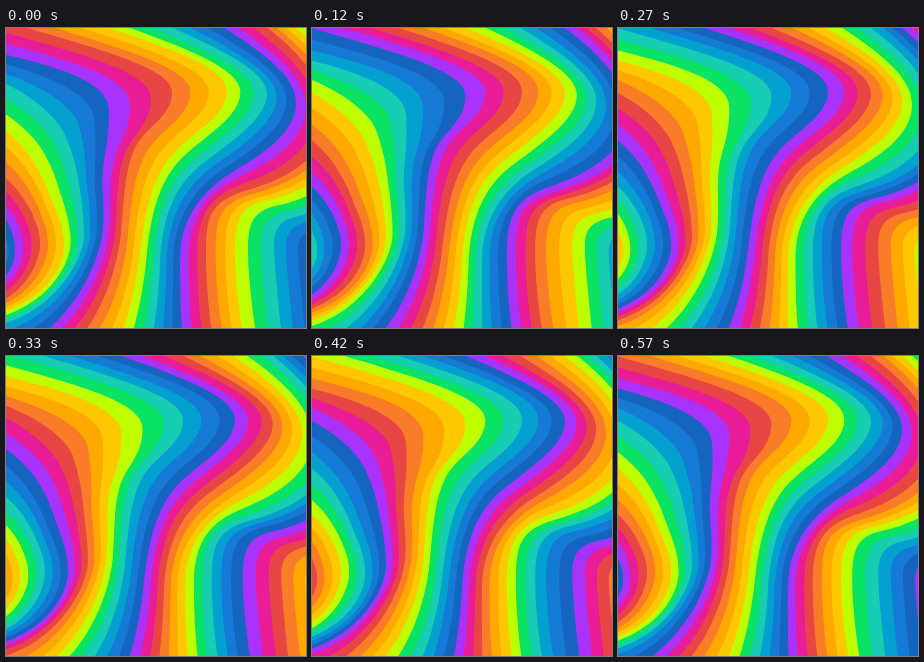
Animation, 300 px wide and 300 px high, one loop 600 ms. Source, as an HTML page without scripts:

```html
<!DOCTYPE html>
<html lang="en">
<head>
<meta charset="utf-8">
<title>Rainbow flow</title>
<style>
html, body { margin: 0; width: 100%; height: 100%; overflow: hidden; background: #1565c0; }
body { position: relative; }
div { display: contents; }

/* Each sheet covers all that lies left of its edge; the edge sweeps the stage in four loops. */
i {
  position: absolute;
  inset: 0;
  background: var(--c);
  animation: flow 2400ms infinite, rank 2400ms infinite;
  animation-timing-function: steps(5), linear;
  animation-delay: calc((var(--g) * 12 + var(--k)) * -50ms - 2ms);
}

/* 30 ms ticks, shifted so that all sheets move together */
i:nth-child(3n+2) {
  animation-timing-function: linear(-.0667 0% 13.33%, .1333 13.33% 33.33%, .3333 33.33% 53.33%,
    .5333 53.33% 73.33%, .7333 73.33% 93.33%, .9333 93.33% 100%), linear;
}
i:nth-child(3n) {
  animation-timing-function: linear(-.1333 0% 6.67%, .0667 6.67% 26.67%, .2667 26.67% 46.67%,
    .4667 46.67% 66.67%, .6667 66.67% 86.67%, .8667 86.67% 100%), linear;
}

i:nth-child(1)  { --k: 0;  --c: #ffc800; }
i:nth-child(2)  { --k: 1;  --c: #beff00; }
i:nth-child(3)  { --k: 2;  --c: #0ae364; }
i:nth-child(4)  { --k: 3;  --c: #16cdb2; }
i:nth-child(5)  { --k: 4;  --c: #03a0d0; }
i:nth-child(6)  { --k: 5;  --c: #147ad4; }
i:nth-child(7)  { --k: 6;  --c: #1565c0; }
i:nth-child(8)  { --k: 7;  --c: #a832fa; }
i:nth-child(9)  { --k: 8;  --c: #e81c96; }
i:nth-child(10) { --k: 9;  --c: #e84644; }
i:nth-child(11) { --k: 10; --c: #f97c28; }
i:nth-child(12) { --k: 11; --c: #ffa800; }

@keyframes rank { from { z-index: 480; } to { z-index: 0; } }

@keyframes flow {
  0%, 6.25% { clip-path: path("M-25 212C-22 213 -20 215 -18 217S-14 219 -12 220S-10 222 -10 224S-12 232 -25 235L-30 340L-30 -30Z"); }
  12.5%  { clip-path: path("M-12 179C-5 185 -1 190 2 195S6 204 7 208S9 215 9 223S6 247 -12 257L-30 340L-30 -30Z"); }
  18.75% { clip-path: path("M-12 141C0 150 9 158 15 167S25 182 28 190S34 203 34 217S22 264 -12 276L-30 340L-30 -30Z"); }
  25%    { clip-path: path("M-12 93C4 106 18 118 28 135S39 155 44 168S58 197 58 217S42 272 -12 287L-30 340L-30 -30Z"); }
  31.25% { clip-path: path("M-12 51C21 63 50 88 58 105S70 138 72 150S78 185 78 208S48 286 -12 298L-30 340L-30 -30Z"); }
  37.5%  { clip-path: path("M-12 24C45 37 103 52 103 82S99 122 97 142S99 175 97 200S78 277 28 313L-30 340L-30 -30Z"); }
  43.75% { clip-path: path("M-12 -10C80 18 166 38 166 64S138 99 128 122S118 175 115 205S100 278 74 310L-30 340L-30 -30Z"); }
  50%    { clip-path: path("M72 -10C152 16 221 37 221 63S186 104 166 127S139 185 134 225S120 295 114 310L-30 340L-30 -30Z"); }
  56.25% { clip-path: path("M147 -9C205 17 261 41 261 66S222 116 195 137S156 190 154 235S148 300 146 310L-30 340L-30 -30Z"); }
  62.5%  { clip-path: path("M200 -12C250 20 290 45 290 75S255 127 230 142S174 182 174 232S176 300 177 310L-30 340L-30 -30Z"); }
  68.75% { clip-path: path("M243 -14C290 20 320 50 320 90S280 151 242 162S200 188 200 225S205 300 207 310L-30 340L-30 -30Z"); }
  75%    { clip-path: path("M270 -16C305 12 345 45 345 95S290 166 262 172S229 190 229 225S236 300 238 310L-30 340L-30 -30Z"); }
  81.25% { clip-path: path("M310 -14C330 0 365 45 365 105S312 184 293 188S268 200 268 218S275 300 276 310L-30 340L-30 -30Z"); }
  87.5%, 100% { clip-path: path("M350 -14C365 0 390 50 390 115S345 196 328 202S304 212 304 226S311 300 312 310L-30 340L-30 -30Z"); }
}
</style>
</head>
<body>
<div style="--g:0"><i></i><i></i><i></i><i></i><i></i><i></i><i></i><i></i><i></i><i></i><i></i><i></i></div>
<div style="--g:1"><i></i><i></i><i></i><i></i><i></i><i></i><i></i><i></i><i></i><i></i><i></i><i></i></div>
<div style="--g:2"><i></i><i></i><i></i><i></i><i></i><i></i><i></i><i></i><i></i><i></i><i></i><i></i></div>
<div style="--g:3"><i></i><i></i><i></i><i></i><i></i><i></i><i></i><i></i><i></i><i></i><i></i><i></i></div>
</body>
</html>
```
